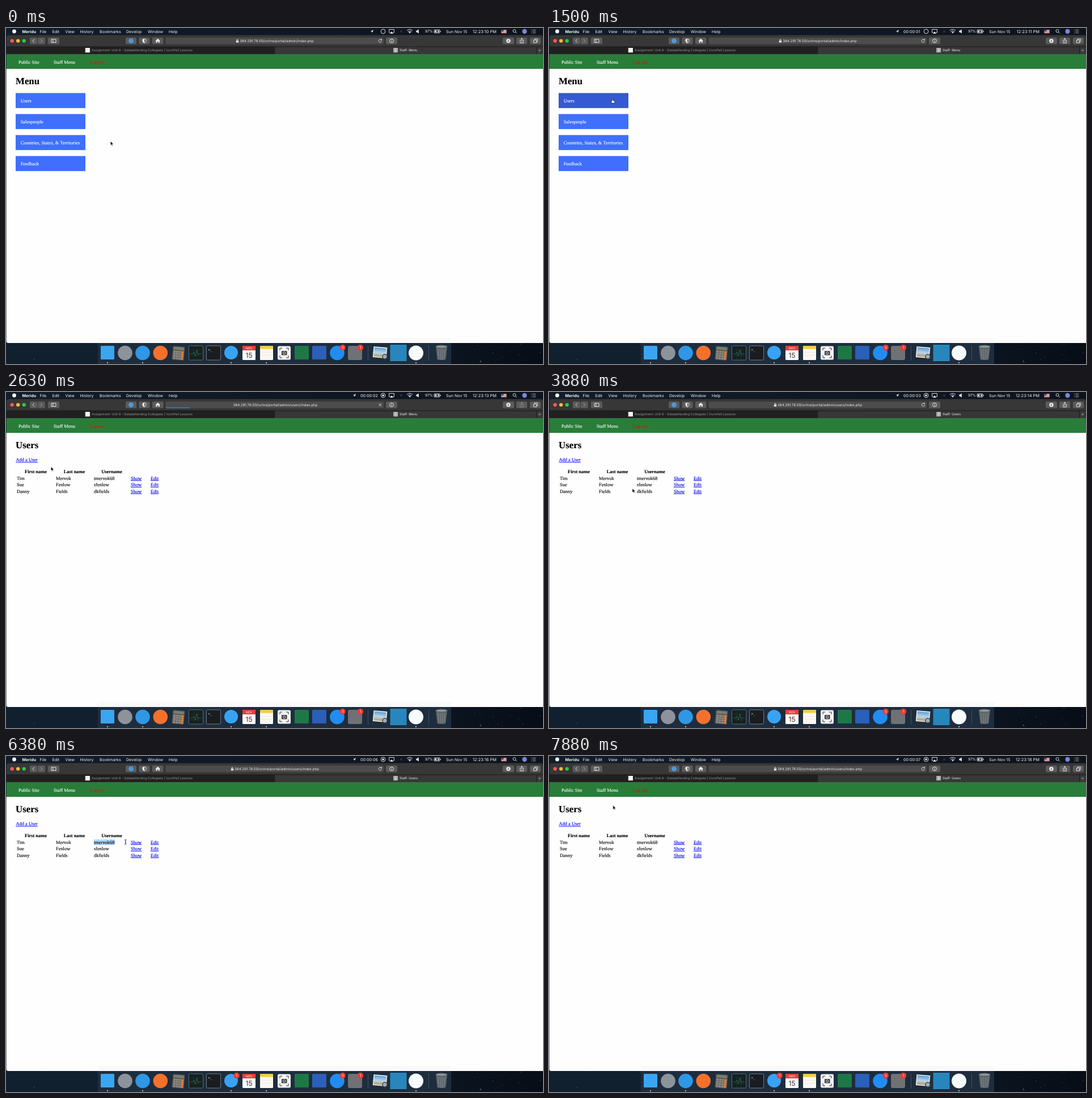
An HTML page that plays this animation: 947x592 px, repeating every 8 s.

```html
<!DOCTYPE html>
<html lang="en">
<head>
<meta charset="utf-8">
<title>Staff menu</title>
<style>
html, body { margin: 0; width: 100%; height: 100%; overflow: hidden; background: #000; }
svg { display: block; width: 100%; height: 100%; text-rendering: geometricPrecision; }
.ui { font-family: Inter, "Open Sans", sans-serif; }
.bar { font-size: 7.1px; fill: #f4f4f4; }
.url { font-size: 6.2px; fill: #eee; text-anchor: middle; }
.tab { font-size: 5.75px; }
.page { font: 8.42px "Liberation Serif", "Times New Roman", serif; stroke-width: .12; }
.page text { stroke: #000; }
.page .light { fill: #fff; stroke: #fff; }
.page .out { fill: #d8160e; stroke: #d8160e; }
.page .link { fill: #0000ee; stroke: #0000ee; text-decoration: underline; }
.h1 { font-size: 16.84px; font-weight: bold; }
.th { font-weight: bold; text-anchor: middle; }
.btn { fill: #5b5b5b; }
.line { fill: none; stroke: #f0f0f0; stroke-width: .9; }
.tile { fill: #3f6ffc; }
.badge { font-size: 5.8px; fill: #fff; text-anchor: middle; }
</style>
</head>
<body>
<svg viewBox="0 0 947 592" preserveAspectRatio="none">
  <defs>
    <linearGradient id="night" x1="0" x2="1">
      <stop offset="0" stop-color="#10202f"/><stop offset=".5" stop-color="#122030"/><stop offset="1" stop-color="#070d16"/>
    </linearGradient>
    <linearGradient id="barFill" x1="0" x2="1">
      <stop offset="0" stop-color="#121c2a"/><stop offset="1" stop-color="#0d131d"/>
    </linearGradient>
    <linearGradient id="photo" x2="0" y2="1">
      <stop offset="0" stop-color="#5f9fd8"/><stop offset=".55" stop-color="#b9d5e6"/><stop offset="1" stop-color="#b59a6d"/>
    </linearGradient>
  </defs>

  <!-- desktop -->
  <rect width="947" height="592" fill="url(#night)"/>
  <rect width="947" height="13" fill="url(#barFill)"/>
  <g id="stars" fill="#cfdbe8"></g>

  <!-- menu bar -->
  <g class="ui bar">
    <circle cx="14.5" cy="6" r="3.4" fill="#fff"/>
    <text x="28.5" y="8.5" font-weight="700">Meridu</text>
    <g id="menus"></g>
    <path id="arrow" d="M2.6-2.8 -2.8-.1 -.2.2 .1 2.8Z" fill="#fff"/>
    <text id="timer" x="625" y="8.8"></text>
    <circle cx="665" cy="6" r="3.9" class="line"/>
    <rect id="recDot" x="663.5" y="4.5" width="3" height="3" rx=".4" fill="#fff"/>
    <path class="line" d="M677.5 8.2H675.6V2.5H684.4V8.2H682.5"/><path d="M680 6.2 683 9.8H677Z" fill="#fff"/>
    <circle cx="697" cy="6" r="2" fill="#2c333c"/>
    <path class="line" d="M706.8 4.5Q712 .3 717.2 4.5M708.6 6.5Q712 3.7 715.4 6.5"/><path d="M712 9.4 710 7.4Q712 6 714 7.4Z"/>
    <path d="M723.3 4.5H725.2L727.8 2.3V9.7L725.2 7.5H723.3Z"/>
    <text x="739" y="8.4" font-size="6.5">97%</text>
    <rect x="755" y="3.2" width="10" height="5.6" rx="1" class="line"/><rect x="756.3" y="4.4" width="7.4" height="3.2"/><path d="M766.3 5v2" class="line"/>
    <path d="M761 2.5 758.4 6.4H760.4L759.6 9.4 762.4 5.6H760.4Z" fill="#000"/>
    <text x="776" y="8.6">Sun Nov 15</text>
    <text id="clock" x="865" y="8.6" font-size="7.4" text-anchor="end"></text>
    <rect x="873.5" y="3" width="9" height="6.2" fill="#eee"/><path d="M873.5 3.5h9m-9 1.8h9m-9 1.8h9m-9 1.7h9" stroke="#c8373f" stroke-width=".8"/><rect x="873.5" y="3" width="4" height="3.3" fill="#33497e"/>
    <circle cx="896.5" cy="5.2" r="2.5" class="line"/><path class="line" d="M898.4 7.1 900.8 9.6"/>
    <circle cx="914.5" cy="6" r="4.2" fill="#7a86d8"/>
    <path class="line" opacity=".7" d="M926 3.3h1m1.3 0h6m-8.3 2.7h1m1.3 0h6m-8.3 2.7h1m1.3 0h6"/>
  </g>

  <!-- browser chrome -->
  <path d="M1 46V17Q1 12.5 5 12.5H943Q947 12.5 947 17V46Z" fill="#373737"/>
  <circle cx="10.7" cy="22.6" r="3.2" fill="#fc5b57"/><circle cx="21.2" cy="22.6" r="3.2" fill="#f6bd3b"/><circle cx="31.7" cy="22.6" r="3.2" fill="#33c748"/>
  <g id="buttons" class="btn"></g>
  <rect x="281.5" y="16.8" width="384.5" height="11.8" rx="2.6" fill="#4c4c4c"/>
  <path class="line" d="M49.8 19.7 47 22.6 49.8 25.5"/>
  <path class="line" opacity=".5" d="M61 19.7 63.8 22.6 61 25.5"/>
  <path class="line" d="M80 19.8h8v5.7h-8ZM82.8 19.8v5.7"/>
  <circle cx="220.5" cy="22.6" r="4.4" fill="#4c98d8"/>
  <path d="M244 19 247 20V23Q246.6 25.2 244 26.5 241.4 25.2 241 23V20Z" class="line"/><path d="M244 19V26.5Q241.4 25.2 241 23V20Z" fill="#f0f0f0"/>
  <path d="M267.7 18.8 272 22.7H270.8V26H268.8V23.5H266.6V26H264.6V22.7H263.4Z" fill="#f0f0f0"/>
  <circle cx="680" cy="22.6" r="3.5" class="line"/><path class="line" d="M680 22v2.5M680 20.3v.9"/>
  <circle cx="886" cy="22.6" r="3.7" fill="#f4f4f4"/><path d="M886 20.3v3.8m-1.6-1.5 1.6 1.6 1.6-1.6" fill="none" stroke="#444" stroke-width=".9"/>
  <path id="share" class="line" d="M908 21.3h-1.2v5h5.6v-5h-1.2M909.6 24.2v-6m-1.7 1.5 1.7-1.6 1.7 1.6"/>
  <path class="line" d="M930.5 21.2h5v4.8h-5ZM932.3 21v-1.8h5v5h-1.6"/>
  <g id="lock" fill="#eee"><rect x="-2.2" y="22.3" width="4.4" height="3.3" rx=".5"/><path d="M-1.3 22.5v-1.2a1.3 1.3 0 0 1 2.6 0v1.2" class="line"/></g>
  <text id="url" class="ui url" y="24.9"></text>
  <rect id="progress" x="282" y="27.3" height="1.2" fill="#3d8fd8"/>
  <path id="reload" class="line" d="M661.6 20.7a2.6 2.6 0 1 0 .8 1.8M662.2 19v2h-2"/>
  <path id="stop" class="line" d="M657.7 20.5l4.2 4.2m0-4.2-4.2 4.2"/>
  <rect x="1" y="33" width="472" height="13" fill="#202020"/>
  <path d="M1 33H947M473.5 33V46M935.5 33V46" stroke="#151515" stroke-width=".8"/>
  <rect x="139.8" y="35" width="8.2" height="8.2" fill="#f2f2f2"/>
  <text class="ui tab" x="151" y="41.3" fill="#929292">Assignment: Unit 9 - Datadefending Collegiate | VurnPell Lessons</text>
  <rect x="683" y="35" width="8.2" height="8.2" rx="1.2" fill="#aaa"/>
  <text class="ui tab" x="687.1" y="41.2" text-anchor="middle" fill="#fff">3</text>
  <text id="title" class="ui tab" x="694" y="41.3" fill="#eee"></text>
  <path d="M941 36.7v5.4m-2.7-2.7h5.4" stroke="#999" stroke-width=".8"/>

  <!-- page -->
  <path d="M.6 72H947V555H4Q.6 555 .6 552Z" fill="#fefefe"/>
  <rect x=".6" y="46" width="947" height="26" fill="#297d39"/>
  <g class="page">
    <text class="light" x="22" y="62.5">Public Site</text>
    <text class="light" x="84" y="62.5">Staff Menu</text>
    <text class="out" x="147.5" y="62.5">Log out</text>
    <g id="menuPage"><text class="h1" x="17" y="99.3">Menu</text></g>
    <g id="usersPage">
      <text class="h1" x="17" y="99.3">Users</text>
      <text class="link" x="17.5" y="122.3">Add a User</text>
      <rect id="mark" x="155" y="147" height="10" fill="#b3d7fe"/>
    </g>
  </g>

  <!-- dock -->
  <path d="M162 555V549Q162 546 165 546H782Q785 546 785 549V555Z" fill="#f9f9f9"/>
  <rect x="162" y="555" width="623" height="37" fill="#1e2d3d"/>
  <path d="M638.5 560v26M745.5 560v26" stroke="#4b5b6a" stroke-width=".8"/>
  <rect x="167" y="560" width="24" height="24" rx="1.5" fill="#3aa5f2"/>
  <circle cx="210" cy="572.5" r="12.8" fill="#8c939b"/>
  <circle cx="241" cy="572.5" r="12.8" fill="#2f97e6"/>
  <circle cx="272.3" cy="572.5" r="12.8" fill="#f4712c"/>
  <g id="keys" transform="rotate(5 304 573)">
    <rect x="293.5" y="561" width="21" height="24" rx="1.8" fill="#5b5754"/>
    <rect x="295" y="562.5" width="18" height="4.5" fill="#77806f"/>
  </g>
  <rect x="322.5" y="560" width="25" height="25" rx="2" fill="#14201f" stroke="#737b7d" stroke-width=".8"/>
  <path d="M325 567.5h20M325 577.5h20M331 562v21M339 562v21" stroke="#263b39" stroke-width=".6"/>
  <path d="M325 574h5l1.5-3 2.5 7 2.5-11 2 9 1.5-2h5" fill="none" stroke="#3d8f73" stroke-width=".6"/>
  <rect x="353.5" y="560" width="25" height="25" rx="2" fill="#191c20" stroke="#8b9294" stroke-width=".8"/>
  <text x="356.5" y="569" font-size="6" fill="#eee" font-family="DejaVu Sans Mono, monospace">&gt;_</text>
  <circle cx="397" cy="572" r="12" fill="#38a3f4"/>
  <rect x="417" y="560" width="23" height="25" rx="1.5" fill="#fafafa"/>
  <path d="M417 568v-6.5q0-1.5 1.5-1.5h20q1.5 0 1.5 1.5V568Z" fill="#e5403a"/>
  <g class="ui" text-anchor="middle"><text x="428.5" y="566.3" font-size="5" fill="#fff">NOV</text><text x="428.5" y="581.3" font-size="12" fill="#333">15</text></g>
  <rect x="448" y="560" width="23" height="25" rx="1.5" fill="#faf8f0"/>
  <rect x="448" y="560" width="23" height="5.5" rx="1.5" fill="#f7cb45"/>
  <path d="M450 571.5h19M450 576.5h19" stroke="#ddd" stroke-width=".6"/>
  <rect x="479" y="560.5" width="23" height="24" rx="2.5" fill="#f4f4f4"/>
  <path d="M483 568v-4h4M494 564h4v4M498 577v4h-4M487 581h-4v-4" fill="none" stroke="#333"/>
  <rect x="486" y="569" width="9.5" height="7.5" rx="1.3" fill="#3a3a3a"/><circle cx="490.7" cy="572.8" r="2.2" fill="none" stroke="#eee"/>
  <rect x="509" y="560" width="25" height="24" rx="1.5" fill="#1e7846"/>
  <rect x="540" y="560" width="25" height="24" rx="1.5" fill="#2a5fba"/>
  <circle cx="584" cy="572.5" r="12.8" fill="#218df2"/>
  <rect x="603" y="560" width="25" height="25" rx="3" fill="#6f7175"/>
  <g transform="rotate(5 660 572)">
    <rect x="647.5" y="562" width="24" height="19" fill="#eee"/>
    <rect x="649" y="563.5" width="21" height="16" fill="url(#photo)"/>
  </g>
  <circle cx="668" cy="579" r="4" fill="#9fb0b9" stroke="#404549" stroke-width="1.5"/>
  <rect x="677.5" y="558" width="29" height="29" fill="#2787bd"/>
  <circle cx="723" cy="572.5" r="13" fill="#f8fbfd"/>
  <path d="M758 561h20l-2.7 23q-7.3 2-14.6 0Z" fill="#5f676c"/>
  <ellipse cx="768" cy="561.5" rx="10" ry="2.5" fill="#8f979b" stroke="#555d62"/>
  <path d="M762 566l1.3 17M766 566l.5 18M770 566l-.5 18M774 566l-1.3 17" stroke="#848c90" stroke-width=".8"/>
  <g id="dots" fill="#e6edf2"></g>
  <g id="badges" class="ui badge"></g>

  <!-- pointers -->
  <g id="pointer">
    <path data-kind="arrow" d="M0 0V7.3L1.7 5.8 2.8 8.3 4 7.8 2.9 5.3H5.2Z" fill="#000" stroke="#fff" stroke-width=".6"/>
    <path data-kind="hand" d="M-1.5-.2Q-1.5-1 -.8-1T0-.2V2L2.7 2.5Q4 2.8 3.8 4.2L3.2 7H-.9Q-1.5 5.5-3 4.3 -3.4 3.2-1.5 3.9Z" fill="#fff" stroke="#111" stroke-width=".7"/>
    <path data-kind="beam" d="M-1.5-4Q0-4 0-3 0-4 1.5-4M0-3.2V3.2M-1.5 4Q0 4 0 3 0 4 1.5 4M-.8.9H.8" fill="none" stroke="#111" stroke-width=".9"/>
  </g>
</svg>
<script>
const NS = 'http://www.w3.org/2000/svg';
const LOOP = 8000, STEP = 125;
const $ = id => document.getElementById(id);

function add(parent, tag, attrs, text) {
  const el = document.createElementNS(NS, tag);
  for (const k in attrs) el.setAttribute(k, attrs[k]);
  if (text !== undefined) el.textContent = text;
  return $(parent).appendChild(el);
}
const show = (el, on) => { el.style.display = on ? '' : 'none'; };
const setText = (id, s) => { if ($(id).textContent !== s) $(id).textContent = s; };

// Static lists
[['File', 59.5], ['Edit', 81.5], ['View', 104.5], ['History', 130.5], ['Bookmarks', 165],
 ['Develop', 212], ['Window', 250], ['Help', 287]]
  .forEach(([s, x]) => add('menus', 'text', { x, y: 8.5 }, s));

[[42, 13], [55.8, 13], [74, 20], [211, 19], [234.5, 19], [258, 19.5], [670, 20], [876, 20], [900, 19], [924, 19]]
  .forEach(([x, width]) => add('buttons', 'rect', { x, y: 16.8, width, height: 11.8, rx: 2.2 }));

const tiles = ['Users', 'Salespeople', 'Countries, States, & Territories', 'Feedback'].map((s, i) => {
  const y = 114.6 + i * 37;
  const tile = add('menuPage', 'rect', { class: 'tile', x: 17, y, width: 123, height: 26.5 });
  add('menuPage', 'text', { class: 'light', x: 25.7, y: y + 16.1 }, s);
  return tile;
});

[['First name', 52.5], ['Last name', 120.5], ['Username', 186.5]]
  .forEach(([s, x]) => add('usersPage', 'text', { class: 'th', x, y: 142.8 }, s));
const columns = [19, 88, 155, 220, 255];
[['Tim', 'Mervok', 'tmervok68'], ['Sue', 'Fenlow', 'sfenlow'], ['Danny', 'Fields', 'dkfields']]
  .forEach((row, r) => [...row, 'Show', 'Edit'].forEach((s, c) =>
    add('usersPage', 'text', { x: columns[c], y: 154.6 + r * 11.6, class: c > 2 ? 'link' : '' }, s)));

for (let i = 0; i < 16; i++)
  add('keys', 'rect', {
    x: 295 + i % 4 * 4.7, y: 569 + Math.floor(i / 4) * 3.9, width: 4, height: 3.2,
    fill: i % 4 === 3 ? '#ee8434' : '#8d8985'
  });

[179, 241, 397, 459, 723].forEach(cx => add('dots', 'circle', { cx, cy: 589.7, r: 1 }));

function badge(cx, n) {
  return [add('badges', 'circle', { cx, cy: 563, r: 5.2, fill: '#ee3b35' }),
          add('badges', 'text', { x: cx, y: 565.1 }, n)];
}
badge(593.7, 3);
badge(625, 1);
const newMessage = badge(406.6, 1);

let seed = 7;
const rand = () => (seed = seed * 16807 % 2147483647) / 2147483647;
for (let i = 0; i < 90; i++)
  add('stars', 'circle', {
    cx: (rand() * 947).toFixed(1), cy: (556 + rand() * 36).toFixed(1),
    r: (.2 + rand() * .45).toFixed(2), opacity: (.2 + rand() * .6).toFixed(2)
  });

// Pointer path: time, x, y
const path = [
  [0, 184.3, 199.4], [400, 184.3, 199.4], [1300, 112, 125.5], [2000, 112, 125.5],
  [2630, 79.3, 131.6], [3000, 90, 140], [3880, 147, 170], [4400, 154.5, 151.5],
  [4950, 210, 151.5], [5250, 210, 151.5], [6380, 210.8, 151.5], [6900, 210.8, 151.5],
  [7750, 112.8, 87], [LOOP, 112.8, 87]
];
function pointerAt(t) {
  const i = Math.max(1, path.findIndex(p => p[0] > t));
  const [t0, x0, y0] = path[i - 1], [t1, x1, y1] = path[i];
  const u = (t - t0) / (t1 - t0), e = u * u * (3 - 2 * u);
  return [x0 + (x1 - x0) * e, y0 + (y1 - y0) * e];
}

const LOAD = 2000, SWAP = 2500, DONE = 2875;
const kinds = document.querySelectorAll('[data-kind]');
const SITE = '384.291.76.50/ochre/portal/admin/';

function draw(now) {
  const t = Math.floor(now % LOOP / STEP) * STEP + 5;
  const [x, y] = pointerAt(t);
  const onUsers = t >= SWAP, loading = t >= LOAD && t < DONE;

  // Menu bar
  const recording = t >= 250;
  setText('clock', `12:23:${10 + Math.floor((t + 430) / 1000)} PM`);
  setText('timer', recording ? `00:00:0${Math.floor(Math.max(0, t - 60) / 1000)}` : '');
  $('arrow').setAttribute('transform', `translate(${recording ? 614.5 : 645.5} 6)`);
  show($('recDot'), t >= 2000);

  // Browser
  const visiting = t >= LOAD;
  setText('url', SITE + (visiting ? 'users/' : '') + 'index.php');
  $('url').setAttribute('x', loading ? 475 : 477.5);
  $('lock').setAttribute('transform', `translate(${visiting ? 399 : 408} 0)`);
  show($('lock'), !loading);
  show($('reload'), !loading);
  show($('stop'), loading);
  show($('progress'), loading);
  $('progress').setAttribute('width', 42 + Math.max(0, t - 2640) * 1.2);
  $('share').setAttribute('opacity', loading ? .3 : 1);
  setText('title', t >= DONE ? 'Staff: Users' : 'Staff: Menu');

  // Page
  show($('menuPage'), !onUsers);
  show($('usersPage'), onUsers);
  const hover = !onUsers && x > 17 && x < 140 && y > 114 && y < 141;
  tiles[0].style.fill = hover ? '#3559d2' : '';
  const marked = t >= 4400 && t < 6900;
  $('mark').setAttribute('width', marked ? Math.max(0, Math.min(37, x - 155)) : 0);
  newMessage.forEach(el => show(el, t >= 5875));

  // Pointer
  const kind = hover ? 'hand' : t >= 4250 && t < 7000 ? 'beam' : 'arrow';
  kinds.forEach(el => show(el, el.dataset.kind === kind));
  $('pointer').setAttribute('transform', `translate(${x.toFixed(2)} ${y.toFixed(2)})`);
}

const start = performance.now();
function tick() {
  draw(performance.now() - start);
  requestAnimationFrame(tick);
}
tick();
</script>
</body>
</html>
```
